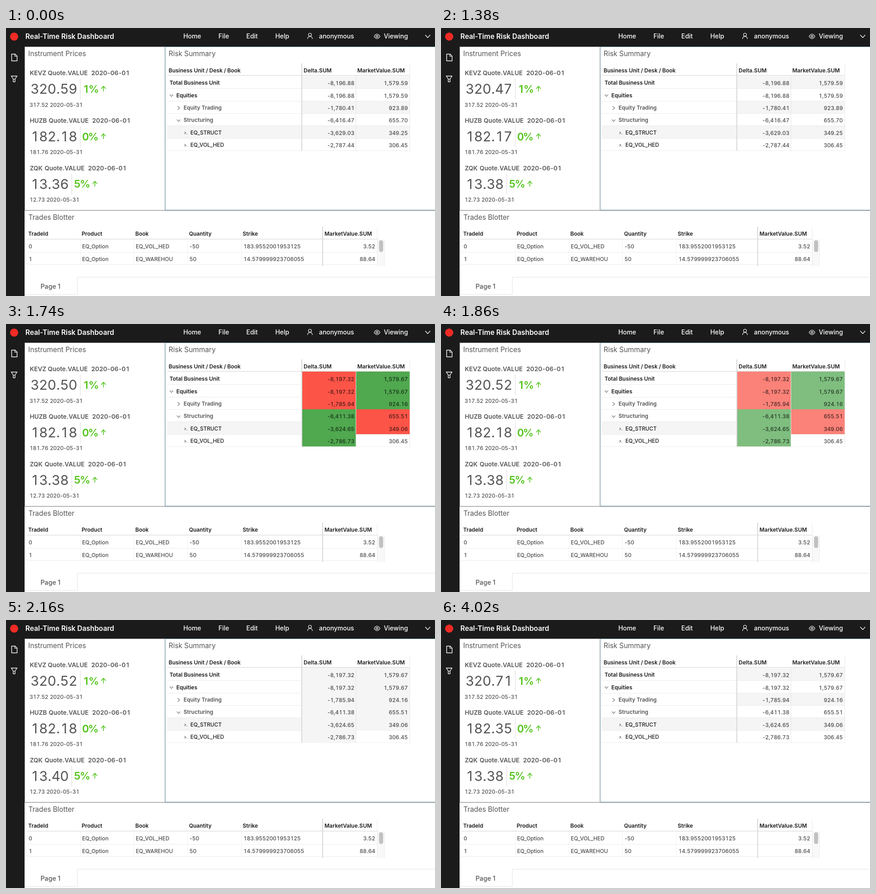
These frames come from a looping animation (947x591 px, 4.08 s). An HTML page with a canvas:

```html
<!DOCTYPE html>
<html lang="en">
<head>
<meta charset="utf-8">
<title>Risk dashboard</title>
<style>
  html, body { margin: 0; width: 100%; height: 100%; overflow: hidden; background: #fff; }
  canvas { display: block; }
</style>
</head>
<body>
<canvas id="stage" width="947" height="591"></canvas>
<script>
const ctx = document.getElementById('stage').getContext('2d');
const LOOP = 4080, STEP = 60;
const INK = 'rgba(0,0,0,.7)', DARK = '#1b1b1b', STRONG = '#1c1c1c', SOFT = '#555';
const BODY = 450;
const SHADE = [245, 245, 245], RED = [255, 38, 22], GREEN = [33, 146, 32];
const ROWS_TOP = [106, 134, 162, 189, 216, 244, 271];
const FLASH = { start: 1440, fade: 1620, end: 2160, clear: 2220 };

// Prices as [time, value] points, counted linearly in between.
const quotes = [
  { name: 'KEVZ', y: 99.5, quoteX: 92.3, dateX: 188, last: '317.52', change: '1%', barX: 164, changeX: 169.2,
    keys: [[0, 320.59], [900, 320.46], [1140, 320.46], [1260, 320.47], [1620, 320.47], [1860, 320.52],
           [2220, 320.52], [3240, 320.66], [3720, 320.66], [4020, 320.71]] },
  { name: 'HUZB', y: 204.2, quoteX: 94.3, dateX: 190, last: '181.76', change: '0%', barX: 164, changeX: 168.2,
    keys: [[0, 182.18], [1020, 182.19], [1140, 182.19], [1440, 182.17], [1680, 182.17], [1800, 182.18],
           [2220, 182.18], [3240, 182.32], [3720, 182.32], [4020, 182.35]] },
  { name: 'ZQK', y: 309, quoteX: 85.3, dateX: 181, last: '12.73', change: '5%', barX: 145, changeX: 150,
    keys: [[0, 13.36], [1020, 13.36], [1080, 13.38], [1860, 13.38], [2160, 13.40], [2220, 13.40],
           [3240, 13.39], [3720, 13.39], [4020, 13.38]] }
];

// Each cell: value before, value after, flash colour.
const risk = [
  ['Total Business Unit', 361, ['-8,196.88', '-8,197.32', RED], ['1,579.59', '1,579.67', GREEN]],
  ['Equities', 376, ['-8,196.88', '-8,197.32', RED], ['1,579.59', '1,579.67', GREEN]],
  ['Equity Trading', 392, ['-1,780.41', '-1,785.94', RED], ['923.89', '924.16', GREEN]],
  ['Structuring', 392, ['-6,416.47', '-6,411.38', GREEN], ['655.70', '655.51', RED]],
  ['EQ_STRUCT', 407, ['-3,629.03', '-3,624.65', GREEN], ['349.25', '349.06', RED]],
  ['EQ_VOL_HED', 407, ['-2,787.44', '-2,786.73', GREEN], ['306.45', '306.45', null]]
];

function box(x, y, w, h, color) {
  ctx.fillStyle = color;
  ctx.fillRect(x, y, w, h);
}

function setFont(size, weight, color) {
  ctx.font = `${weight} ${size}px Inter, "Open Sans", sans-serif`;
  ctx.fillStyle = color;
}

// y is the middle of the capitals.
function text(str, x, y, size, weight = 400, color = SOFT) {
  setFont(size, weight, color);
  ctx.textAlign = 'left';
  ctx.fillText(str, x, y + size * .364);
}

function cellWidth(ch, size, extra) {
  const em = ch === '-' ? .5 : ch === '%' ? .87 : /\d/.test(ch) ? .63 : .295;
  return em * size + extra;
}

// Numbers with digits of equal width.
function figures(str, x, y, size, { weight = BODY, color = INK, extra = .12, right = false } = {}) {
  setFont(size, weight, color);
  ctx.textAlign = 'center';
  const widths = [...str].map(ch => cellWidth(ch, size, extra));
  if (right) x -= widths.reduce((a, b) => a + b, 0);
  [...str].forEach((ch, i) => {
    ctx.fillText(ch, x + widths[i] / 2, y + size * .364);
    x += widths[i];
  });
}

function stroke(points, color, width, close = false) {
  ctx.beginPath();
  points.forEach(([x, y]) => ctx.lineTo(x, y));
  if (close) ctx.closePath();
  ctx.strokeStyle = color;
  ctx.lineWidth = width;
  ctx.stroke();
}

function ring(x, y, r, width) {
  ctx.beginPath();
  ctx.arc(x, y, r, 0, Math.PI * 2);
  ctx.strokeStyle = '#fff';
  ctx.lineWidth = width;
  ctx.stroke();
}

const chevronDown = (x, y, w, h, color, width) =>
  stroke([[x - w, y - h], [x, y + h], [x + w, y - h]], color, width);
const chevronRight = (x, y, w, h, color, width) =>
  stroke([[x - w, y - h], [x + w, y], [x - w, y + h]], color, width);

function valueAt(keys, t) {
  for (let i = 1; i < keys.length; i++) {
    const [t0, a] = keys[i - 1], [t1, b] = keys[i];
    if (t <= t1) return a + (b - a) * (t - t0) / (t1 - t0);
  }
  return keys[keys.length - 1][1];
}

function drawFrame() {
  box(0, 0, 947, 591, '#fff');
  box(0, 0, 947, 41, DARK);
  box(0, 0, 41, 591, DARK);

  ctx.beginPath();
  ctx.arc(18, 19, 9, 0, Math.PI * 2);
  ctx.fillStyle = '#ee2b24';
  ctx.fill();
  text('Real-Time Risk Dashboard', 42.8, 18.5, 15.45, 600, '#fff');
  [['Home', 391.5], ['File', 469], ['Edit', 530.5], ['Help', 594.5], ['anonymous', 691], ['Viewing', 834]]
    .forEach(([label, x]) => text(label, x, 18, 13.9, 500, '#fff'));

  ring(671, 14.8, 3.3, 1.2);
  ctx.beginPath();
  ctx.arc(671, 24, 5.4, Math.PI, 0);
  ctx.stroke();
  ctx.beginPath();
  ctx.moveTo(812.5, 18.5);
  ctx.quadraticCurveTo(819, 8.5, 825.5, 18.5);
  ctx.quadraticCurveTo(819, 28.5, 812.5, 18.5);
  ctx.stroke();
  ring(819, 18.5, 2.1, 1.2);
  chevronDown(931, 18.3, 5.5, 3, '#fff', 1.3);

  stroke([[12.5, 57.5], [20, 57.5], [24.5, 62], [24.5, 72.5], [12.5, 72.5]], '#fff', 1.4, true);
  stroke([[19.5, 57.5], [19.5, 62.5], [24.5, 62.5]], '#fff', 1.2);
  stroke([[11.7, 106], [24.3, 106], [20, 112.5], [20, 118.5], [16, 118.5], [16, 112.5]], '#fff', 1.3, true);
  stroke([[16, 112.9], [20, 112.9]], '#fff', 1.1);

  box(41, 41, 1, 361, '#a0a0a0');
  box(41, 41, 310, 1, '#a0a0a0');
  box(350, 41, 1, 361, '#cfcfcf');
  box(41, 401, 310, 1, '#cfcfcf');
  box(41, 402, 906, 1, '#999');
  ctx.strokeStyle = '#7399ab';
  ctx.lineWidth = 1;
  ctx.strokeRect(351.5, 41.5, 600, 360);
  text('Instrument Prices', 49, 56.3, 15.4);
  text('Risk Summary', 359, 56.3, 15.4);
  text('Trades Blotter', 49.5, 417.5, 15.3);
}

function drawQuote(q, t) {
  const mid = q.y + 35;
  text(q.name, 52.5, q.y, 13.5, 600);
  text('Quote.VALUE', q.quoteX, q.y, 13.5, 600);
  figures('2020-06-01', q.dateX, q.y, 13.5, { weight: 600, color: SOFT, extra: .35 });
  figures(valueAt(q.keys, t).toFixed(2), 54.2, mid, 30, { weight: 400, color: SOFT, extra: -.05 });
  box(q.barX - .5, mid - 23, 1, 46, '#dadada');
  figures(q.change, q.changeX, mid, 23, { weight: 600, color: '#52c41a' });
  const ax = q.barX + 51.2, ay = mid - .5;
  stroke([[ax, ay + 6], [ax, ay - 5]], '#52c41a', 1.6);
  stroke([[ax - 5, ay], [ax, ay - 5.5], [ax + 5, ay]], '#52c41a', 1.6);
  figures(q.last + ' 2020-05-31', 52, q.y + 69.7, 12, { color: SOFT, extra: 0 });
}

function flashColor(color, t) {
  const p = Math.min(1, Math.max(0, (t - FLASH.fade) / (FLASH.end - FLASH.fade)));
  return `rgb(${color.map((c, i) => Math.round(c + (SHADE[i] - c) * p))})`;
}

function drawRisk(t) {
  const updated = t >= FLASH.start, flashing = updated && t < FLASH.clear;
  text('Business Unit / Desk / Book', 359, 93.3, 12, 600, STRONG);
  text('Delta.SUM', 657, 93.3, 12, 600, STRONG);
  text('MarketValue.SUM', 775.5, 93.3, 12, 600, STRONG);

  risk.forEach(([label, x, ...cells], i) => {
    const top = ROWS_TOP[i], h = ROWS_TOP[i + 1] - top, y = top + h / 2 + 1;
    if (i === 4) box(356, top, 296, h - 1, '#f5f5f5');
    cells.forEach(([before, after, color], c) => {
      const left = 654 + 119 * c;
      if (i % 2 === 0) box(left, top, 118, h - 1, '#f5f5f5');
      if (flashing && color) box(left, top - 1, 118, h, flashColor(color, t));
      figures(updated ? after : before, 769 + 118 * c, y + .3, 12, { right: true });
    });
    const child = i > 3;
    text(label, x, y - .5, child ? 11.8 : 12, child ? BODY : 600, i < 2 || child ? STRONG : SOFT);
    box(356, top + h - 1, 296, 1, '#ececec');
    box(654, top + h - 1, 237, 1, flashing ? 'rgba(236,236,236,.55)' : '#ececec');
  });

  box(356, 104, 535, 1, '#d2d2d2');
  box(652, 78, 2, 193, '#d9d9d9');
  box(772, 105, 1, 166, '#e6e6e6');
  box(891, 78, 1, 193, '#e9e9e9');

  chevronDown(365.3, 148.8, 3.8, 2.1, '#666', 1.1);
  chevronRight(381, 176.3, 2.3, 4, '#666', 1.1);
  chevronDown(381, 204, 3.8, 2.1, '#666', 1.1);
  [231.3, 258.5].forEach(y => {
    chevronRight(395.5, y, 1.4, 2.2, '#4c5663', 1.1);
    box(398.3, y + 2, 1.6, 1.4, '#7b8794');
  });
}

function drawTrades() {
  [['TradeId', 49], ['Product', 167], ['Book', 285.5], ['Quantity', 404], ['Strike', 522.5], ['MarketValue.SUM', 703]]
    .forEach(([label, x]) => text(label, x, 454, 12, 600, STRONG));

  const trades = [
    ['0', 'EQ_VOL_HED', '-50', '183.9552001953125', '3.52'],
    ['1', 'EQ_WAREHOU', '50', '14.579999923706055', '88.64']
  ];
  trades.forEach(([id, book, quantity, strike, value], i) => {
    const y = 481.8 + 27.6 * i;
    figures(id, 50, y, 12);
    text('EQ_Option', 168, y, 11.8, BODY, INK);
    text(book, 286.5, y, 11.8, BODY, INK);
    figures(quantity, 405, y, 12);
    figures(strike, 524, y, 12);
    figures(value, 815, y, 12, { right: true });
    box(46, 494 + 27 * i, 773, 1, '#ececec');
  });

  [164, 282, 400, 519].forEach(x => box(x, 466, 1, 59, '#f0f0f0'));
  box(46, 465, 773, 1, '#d2d2d2');
  box(698, 438, 2, 87, '#d9d9d9');
  box(819, 439, 1, 86, '#e9e9e9');
  box(820, 466, 16, 59, '#f8f8f8');
  box(835, 466, 1, 59, '#ebebeb');
  ctx.beginPath();
  ctx.roundRect(823.5, 468, 9, 26, 4.5);
  ctx.fillStyle = '#c1c1c1';
  ctx.fill();

  box(157, 549, 790, 1, '#e4e4e4');
  box(157, 549, 1, 39, '#e4e4e4');
  box(41, 587, 117, 1, '#e4e4e4');
  text('Page 1', 76.3, 569.5, 14.2, BODY);
}

function render(now) {
  const t = Math.floor((now % LOOP) / STEP) * STEP;
  drawFrame();
  quotes.forEach(q => drawQuote(q, t));
  drawRisk(t);
  drawTrades();
}

const origin = performance.now();
function tick() {
  render(performance.now() - origin);
  requestAnimationFrame(tick);
}
tick();
</script>
</body>
</html>
```
